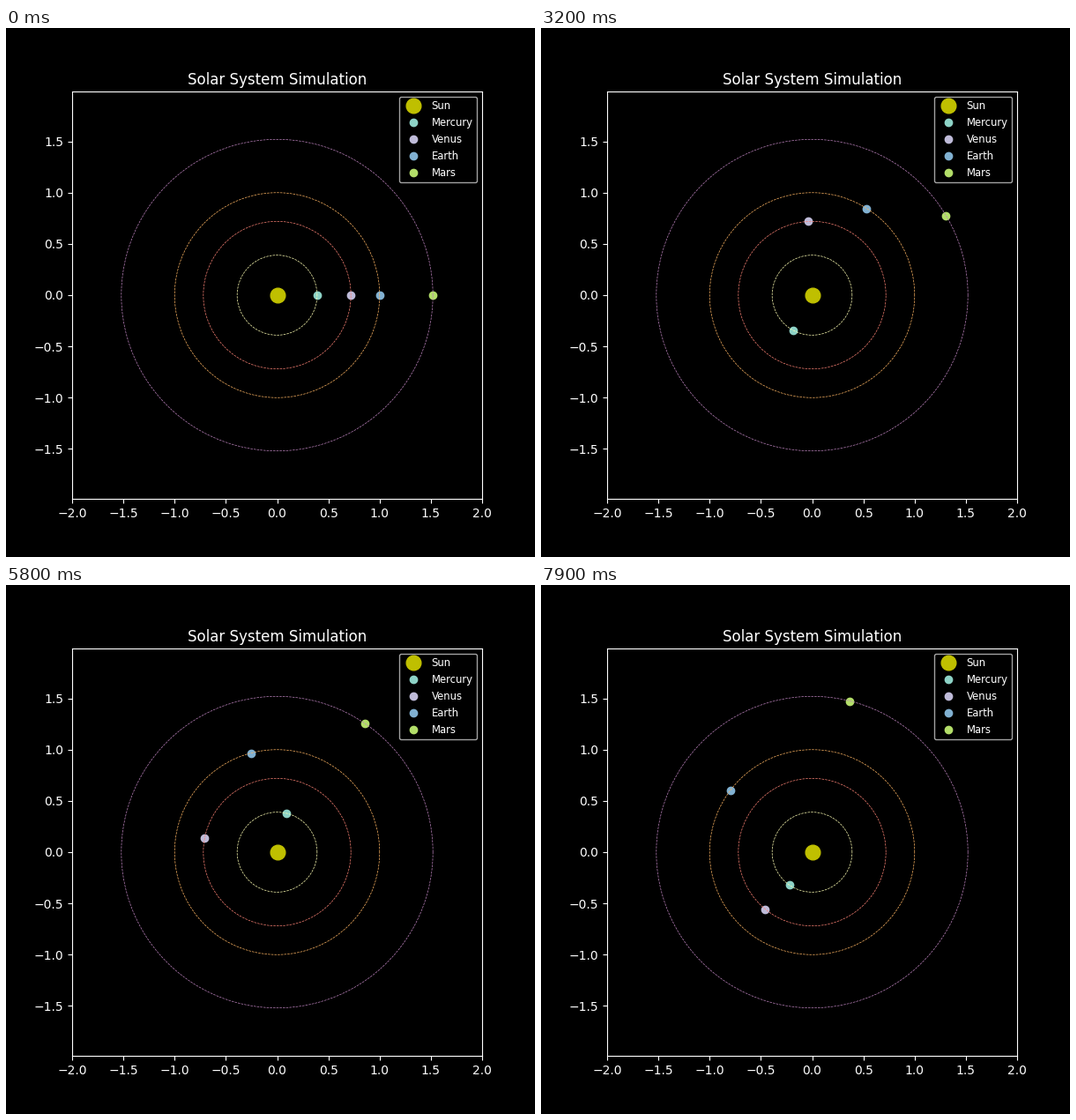
Write a matplotlib script that moves like this. It is 600 px wide and 600 px high and loops after 8000 ms.

```python
import numpy as np
import matplotlib.pyplot as plt
from matplotlib.animation import FuncAnimation

FRAMES = 80
INTERVAL = 100  # ms

# name: (orbit radius in AU, period in years)
PLANETS = {
    "Mercury": (0.39, 0.24),
    "Venus": (0.72, 0.62),
    "Earth": (1.00, 1.00),
    "Mars": (1.52, 1.88),
}

plt.style.use("dark_background")
fig, ax = plt.subplots(figsize=(6, 6), dpi=100)

theta = np.linspace(0, 2 * np.pi, 200)  # one Earth year

ax.plot(0, 0, "yo", markersize=12, label="Sun")
dots = []
for name, (radius, _) in PLANETS.items():
    dot, = ax.plot([radius], [0], "o", markersize=6, label=name)
    ax.plot(radius * np.cos(theta), radius * np.sin(theta), "--", linewidth=0.5)
    dots.append(dot)

# Equal scale on both axes, filling the default axes box
box = ax.get_position()
ax.set_xlim(-2, 2)
ax.set_ylim(-2 * box.height / box.width, 2 * box.height / box.width)
ax.set_title("Solar System Simulation")
ax.legend(loc="upper right", fontsize="small")


def update(frame):
    for dot, (radius, period) in zip(dots, PLANETS.values()):
        angle = theta[frame] / period
        dot.set_data([radius * np.cos(angle)], [radius * np.sin(angle)])
    return dots


anim = FuncAnimation(fig, update, frames=FRAMES, interval=INTERVAL,
                     repeat=True, repeat_delay=0, blit=False)
plt.show()
```
